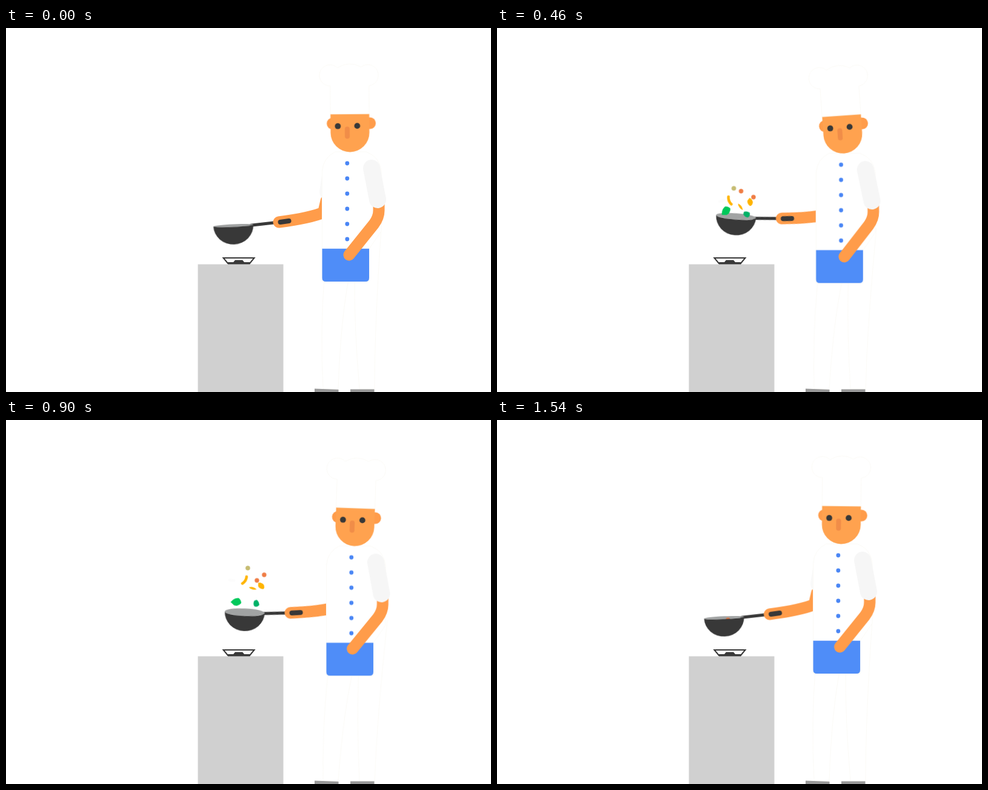
Animation of 800 by 600 pixels, one loop 1.56 s. Source, as an HTML page without scripts:

```html
<!DOCTYPE html>
<html lang="en">
<head>
<meta charset="utf-8">
<title>Chef tossing a wok</title>
<style>
html, body { margin: 0; width: 100%; height: 100%; overflow: hidden; background: #fff; }
svg { display: block; width: 800px; height: 600px; }

.white { fill: #fff; stroke: #fbfaf6; }
.skin { fill: #ff9c4a; }
.limb { fill: none; stroke: #ff9c4a; stroke-width: 19; stroke-linecap: round; stroke-linejoin: round; }
.dark { fill: #383838; }
.rod { fill: none; stroke: #383838; stroke-linecap: round; }
.blue { fill: #4f8df8; }
.sleeve { fill: none; stroke: #f6f6f6; stroke-width: 28; stroke-linecap: round; }

.body, .legs { animation: sway 780ms cubic-bezier(.37, 0, .63, 1) infinite alternate; }
.legs { animation-name: lean; transform-origin: 0 597px; }
.head { animation: nod 1560ms infinite; transform-origin: 567.5px 200px; }
.front-arm { animation: swing 1560ms linear infinite; transform-origin: 603px 231px; }
.back-sleeve { animation: tuck 1560ms linear infinite; transform-origin: 537px 232px; }
.pan { animation: shake 1560ms linear infinite; transform-origin: 450px 320px; }
.rim { animation: open-rim 1560ms linear infinite; }
.bowl { animation: open-bowl 1560ms linear infinite; }
.food > * { animation: toss 1560ms linear infinite; }

@keyframes sway { to { transform: translate(7.3px, 3.6px); } }
@keyframes lean { to { transform: skewX(-2.3deg); } }
@keyframes nod {
  0% { transform: rotate(-.4deg); animation-timing-function: cubic-bezier(.3, .5, .64, 1); }
  24% { transform: rotate(-4.2deg); animation-timing-function: cubic-bezier(.37, 0, .63, 1); }
  73% { transform: rotate(3.8deg); animation-timing-function: cubic-bezier(.36, 0, .7, .5); }
  100% { transform: rotate(.4deg); }
}
@keyframes swing {
  0%, 100% { transform: rotate(0deg); }
  19.2% { transform: rotate(-.7deg); }
  29.5% { transform: rotate(-.9deg); }
  47.4% { transform: rotate(-.4deg); }
  66.7% { transform: rotate(1.3deg); }
  82% { transform: rotate(2deg); }
  90% { transform: rotate(1.3deg); }
}
@keyframes tuck {
  0%, 82%, 100% { transform: rotate(0deg); }
  19.2%, 47.4% { transform: rotate(-13deg); }
  66.7% { transform: rotate(-9deg); }
}
@keyframes shake {
  0%, 100% { transform: translate(0, 0) rotate(0deg); }
  9.6% { transform: translate(6.8px, -1.8px) rotate(1.9deg); }
  19.2% { transform: translate(14.5px, -4px) rotate(4.3deg); }
  29.5% { transform: translate(19.5px, -6px) rotate(6.9deg); }
  38% { transform: translate(21.5px, -6.7px) rotate(8.2deg); }
  47.4% { transform: translate(21.5px, -6.5px) rotate(8.6deg); }
  57% { transform: translate(19.5px, -2.5px) rotate(5.5deg); }
  66.7% { transform: translate(13.5px, 2.5px) rotate(.4deg); }
  74% { transform: translate(7.5px, 4px) rotate(-2deg); }
  82% { transform: translate(2px, 4px) rotate(-3deg); }
  90% { transform: translate(-1.2px, 2.5px) rotate(-2deg); }
  98.7% { transform: translate(-.5px, .2px) rotate(0deg); }
}
@keyframes open-rim {
  0%, 100% { ry: 2.2px; }
  19.2% { ry: 3.8px; }
  29.5% { ry: 5.2px; }
  47.4% { ry: 6.6px; }
  66.7% { ry: 6px; }
  82% { ry: 4.2px; }
}
@keyframes open-bowl {
  0%, 100% { d: path("M-33 0A33 2.2 0 0 0 33 0A33 31 0 0 1 -33 0Z"); }
  19.2% { d: path("M-33 0A33 3.8 0 0 0 33 0A33 31 0 0 1 -33 0Z"); }
  29.5% { d: path("M-33 0A33 5.2 0 0 0 33 0A33 31 0 0 1 -33 0Z"); }
  47.4% { d: path("M-33 0A33 6.6 0 0 0 33 0A33 31 0 0 1 -33 0Z"); }
  66.7% { d: path("M-33 0A33 6 0 0 0 33 0A33 31 0 0 1 -33 0Z"); }
  82% { d: path("M-33 0A33 4.2 0 0 0 33 0A33 31 0 0 1 -33 0Z"); }
}
/* rest in the bowl, rise through a and b to the top c, fall through d and e */
@keyframes toss {
  0%, 9%, 100% { transform: translate(378px, 341px) rotate(0deg); }
  19.2% { transform: var(--a); }
  29.5% { transform: var(--b); animation-timing-function: cubic-bezier(.2, .6, .5, 1); }
  47.4% { transform: var(--c); animation-timing-function: cubic-bezier(.5, 0, .8, .6); }
  66.7% { transform: var(--d); }
  82% { transform: var(--e, translate(374px, 346px) rotate(0deg)); }
  92%, 98.8% { transform: var(--z, translate(376px, 341px) rotate(0deg)); }
}

.leaf { fill: #00c85a;
  --a: translate(372px, 314px) rotate(30deg); --b: translate(377.5px, 302px) rotate(-50deg);
  --c: translate(382.5px, 291.5px) rotate(5deg); --d: translate(371.5px, 324px) rotate(-40deg); }
.sprig { fill: #00b167;
  --a: translate(407px, 315px) rotate(0deg); --b: translate(412px, 307px) rotate(30deg);
  --c: translate(415.5px, 295px) rotate(80deg); --d: translate(406px, 323.5px) rotate(100deg); }
.stick { fill: none; stroke: #ffb400; stroke-width: 4.6; stroke-linecap: round;
  --a: translate(368px, 308px) rotate(45deg); --b: translate(383px, 285px) rotate(70deg);
  --c: translate(397.5px, 255px) rotate(-65deg); --d: translate(385.5px, 291px) rotate(-40deg);
  --e: translate(380px, 337px) rotate(-30deg); }
.chip { fill: #ffb400;
  --a: translate(393.5px, 313px) rotate(-50deg); --b: translate(401.5px, 295px) rotate(40deg);
  --c: translate(411px, 271px) rotate(12deg); --d: translate(396px, 295.5px) rotate(-30deg); }
.chunk { fill: #ffb400;
  --a: translate(408px, 312px) rotate(-35deg); --b: translate(417.5px, 287px) rotate(65deg);
  --c: translate(425.5px, 261.5px) rotate(20deg); --d: translate(408px, 306px) rotate(50deg); }
.slice { fill: #fcfcfc;
  --a: translate(386px, 315px) rotate(20deg); --b: translate(371px, 285px) rotate(-20deg);
  --c: translate(374px, 253px) rotate(0deg); --d: translate(368px, 295px) rotate(20deg); }
.pea { fill: #c6bc72;
  --a: translate(382px, 305px); --b: translate(390.5px, 264.5px); --c: translate(402px, 238px);
  --d: translate(390px, 261px); --e: translate(377px, 300.5px); }
.carrot { fill: #ef7d45; }
.inner { --a: translate(395px, 298.5px); --b: translate(402.5px, 269px); --c: translate(414.5px, 258.5px);
  --d: translate(412px, 281px); --e: translate(405px, 320px); --z: translate(381px, 329.5px); }
.outer { --a: translate(416.5px, 307.5px); --b: translate(423px, 279px); --c: translate(429px, 249px);
  --d: translate(417px, 272.5px); --e: translate(401.5px, 307.5px); }
</style>
</head>
<body>
<svg viewBox="0 0 800 600">
  <!-- stove -->
  <rect x="316.5" y="389.5" width="141" height="211" fill="#d0d0d0"/>
  <path class="rod" stroke-width="2" d="M366 388L358.500 379H409.500L402 388"/>
  <path class="dark" d="M366 389.500V386H375L378 382.500H390L393 386H402.500V389.500Z"/>

  <!-- legs and shoes -->
  <g class="legs white">
    <path d="M525 410Q518 500 523 595H548Q552 480 566 410"/>
    <path d="M575 410Q574 490 583 595H608Q608 490 619 330"/>
  </g>
  <path fill="#999" d="M509 594.500L548.500 596V600H509ZM568 595.500H607.500V600H568Z"/>

  <!-- far arm with pan -->
  <g class="pan">
    <path class="rod" stroke-width="5" d="M404 325.300L446 320.500"/>
    <path class="limb" d="M450 320Q503 313 523.500 304L528 285"/>
    <path class="rod" stroke-width="8" d="M452.500 320L466.500 318"/>
    <g transform="translate(375 325.700) rotate(-2.600)">
      <ellipse class="rim" rx="33" ry="2.200" fill="#a1a3a3"/>
    </g>
  </g>

  <g class="body">
    <path class="back-sleeve sleeve" d="M537 232L531 270" style="stroke: #f9f9f9"/>
    <path class="white" d="M521.500 418V236Q523 214 543 204H594Q616 212 619 235V335L599 364V418Z"/>
    <path class="blue" d="M521.500 363.700H599V412Q599 418 593 418H527.500Q521.500 418 521.500 412Z"/>
    <path fill="none" stroke="#4a86f5" stroke-width="6.800" stroke-linecap="round" stroke-dasharray="0 25" d="M562.800 223V349"/>
    <g class="front-arm">
      <path class="limb" d="M615 283V301Q615 312 607 323L566 374"/>
      <path class="sleeve" d="M603 231L613 283"/>
    </g>
    <g class="head">
      <g transform="translate(.6 .4)">
        <circle class="skin" cx="538.500" cy="157" r="9.700"/>
        <circle class="skin" cx="600" cy="156.700" r="9.700"/>
        <path fill="#ffa24f" d="M535 140H599V172A32 32 0 0 1 535 172Z"/>
        <circle class="dark" cx="547" cy="161.300" r="4.900"/>
        <circle class="dark" cx="579" cy="161" r="4.900"/>
        <path fill="none" stroke="#f18d48" stroke-width="8" stroke-linecap="round" d="M562.500 166V178"/>
        <path class="white" d="M535 141.300V95A17.500 17.500 0 1 1 547 65Q567 53 586 64A17.500 17.500 0 1 1 599 95V141.300Z"/>
      </g>
    </g>
  </g>

  <g class="food">
    <ellipse class="slice" rx="6" ry="2.500"/>
    <path class="stick" d="M-6.500 -1Q0 2 6.500 -1"/>
    <path class="chip" d="M-6.500 -1.500Q0 -4 6.500 1.500Q0 4 -6.500 -1.500Z"/>
    <path class="chunk" d="M-6.500 -2Q-4 -5 2 -4Q7 -1 6 3Q0 6 -4 3Z"/>
    <path class="leaf" d="M-9 -1Q-3 -7 5 -6Q9 -2 8 3Q2 8 -4 5Z"/>
    <path class="sprig" d="M-6 -1Q-3 -5 3 -4.500Q7 0 4 4Q-1 6 -5 3Z"/>
    <circle class="pea" r="3.800"/>
    <circle class="carrot inner" r="3.700"/>
    <circle class="carrot outer" r="3.700"/>
  </g>

  <g class="pan">
    <g transform="translate(375 325.700) rotate(-2.600)">
      <path class="bowl dark" d="M-33 0A33 2.200 0 0 0 33 0A33 31 0 0 1 -33 0Z"/>
    </g>
  </g>
</svg>
</body>
</html>
```
